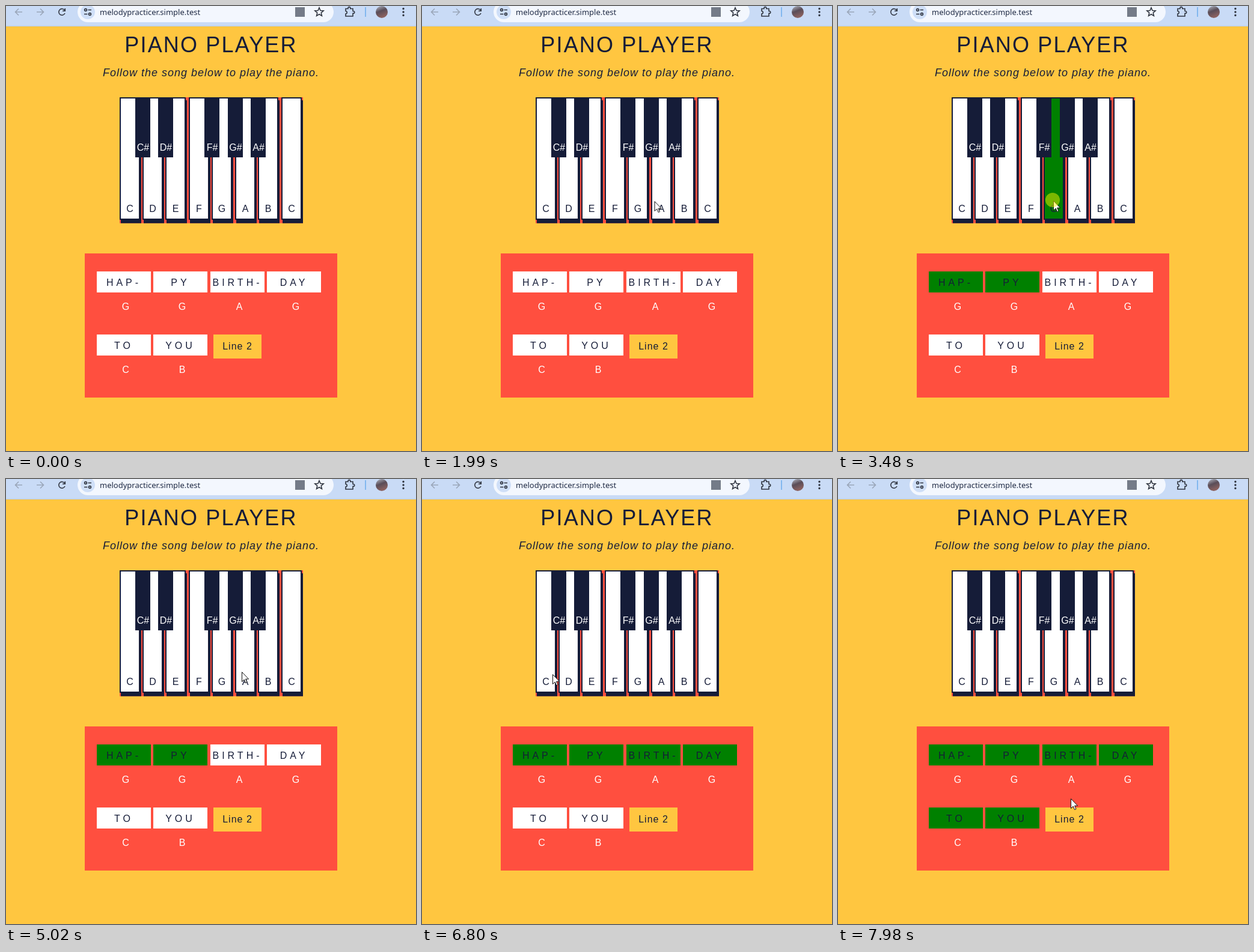
An HTML page that plays this animation: 682x741 px, repeating every 8000 ms.

```html
<!DOCTYPE html>
<html lang="en">
<head>
<meta charset="utf-8">
<title>Piano Player</title>
<style>
  html, body { margin: 0; width: 100%; height: 100%; overflow: hidden; background: #ffc640; }
  svg { display: block; width: 682px; height: 741px; }
  text { font: 16px "Liberation Sans", Arial, sans-serif; fill: #151c38; text-anchor: middle; white-space: pre; }
  .title { font-size: 36px; letter-spacing: .06em; }
  .hint { font-size: 18px; font-style: italic; letter-spacing: 1px; }
  .word { letter-spacing: 5px; }
  .button { letter-spacing: 1px; }
  .light { fill: #fff; }
  .address { font: 13px "Noto Sans", sans-serif; fill: #1f2a44; text-anchor: start; }
  .icon { fill: none; stroke: #303540; stroke-width: 1.6; }
  .faint { stroke: #9aa6b9; }
</style>
</head>
<body>
<svg id="stage" viewBox="0 0 682 741">
  <defs>
    <linearGradient id="avatar" x2=".4" y2="1">
      <stop offset="0" stop-color="#b9bfca"/>
      <stop offset=".5" stop-color="#5a4d58"/>
      <stop offset="1" stop-color="#8c6260"/>
    </linearGradient>
  </defs>
  <rect width="682" height="741" fill="#ffc640"/>
  <rect width="682" height="34" fill="#b5cdf3"/>
  <rect width="682" height="33" fill="#c9dbf6"/>
  <rect x="119" y="-7" width="426" height="34" rx="17" fill="#f3f7fe"/>
  <circle cx="136" cy="10" r="12" fill="#cfdff8"/>
  <text class="address" x="156" y="15">melodypracticer.simple.test</text>
  <g class="icon">
    <path class="faint" d="M27 10H15.5m5.500-5.500L15.5 10l5.500 5.500M51 10h11.500m-5.500-5.500l5.500 5.500l-5.500 5.500"/>
    <path d="M97.500 7A5.300 5.300 0 1 0 98 12M98.300 4v4.300H94"/>
    <circle cx="132.500" cy="6.500" r="1.900"/>
    <circle cx="139.500" cy="13.500" r="1.900"/>
    <path d="M136.500 6.500h5.500M130 13.500h5.500"/>
    <path id="star"/>
    <path d="M565 4.500h4v-1a1.900 1.900 0 0 1 3.800 0v1H577v4h.8a1.900 1.900 0 0 1 0 3.800H577V17h-12v-4a2.200 2.200 0 0 0 0-4.500z"/>
    <path d="M661 4.500h0M661 10h0M661 15.500h0" stroke-width="3.400" stroke-linecap="round" style="stroke-width:3.400"/>
  </g>
  <rect x="481" y="2" width="16" height="16" fill="#747b88"/>
  <rect x="597" y="2" width="2" height="16" fill="#82b8ef"/>
  <circle cx="625" cy="10" r="10" fill="url(#avatar)"/>
</svg>
<script>
const LOOP = 8000, TICK = 70;
const NAVY = '#151c38', RED = '#ff4f3f', GREEN = '#008000', WHITE = '#fff';
const SPACE = 4.445; // width of the blank between inline boxes
const stage = document.getElementById('stage');

// word, note, time of the hit, how long the key stays down
const song = [
  ['HAP-', 'G', 3050, 0], ['PY', 'G', 3480, 130], ['BIRTH-', 'A', 5220, 130],
  ['DAY', 'G', 5910, 130], ['TO', 'C', 6880, 70], ['YOU', 'B', 7480, 130]
];

// start, end, x, y of each pointer move
const moves = [
  [190, 610, 264, 406], [740, 810, 270, 395], [1090, 1640, 422, 326], [1640, 2260, 358, 324],
  [4070, 4340, 278, 331], [4340, 4680, 392, 321], [5350, 5770, 355, 311],
  [6120, 6800, 217, 325], [6950, 7280, 445, 321], [7680, 7980, 387, 532]
];

function add(tag, attrs, parent = stage) {
  const el = document.createElementNS('http://www.w3.org/2000/svg', tag);
  for (const name in attrs) el.setAttribute(name, attrs[name]);
  return parent.appendChild(el);
}

const rect = (x, y, width, height, fill) => add('rect', { x, y, width, height, fill });

function label(content, x, y, style = '') {
  add('text', { x, y, class: style }).textContent = content;
}

// Each entry is [time, properties, steps until the next entry].
function play(el, entries) {
  const frames = entries.map(([time, props, steps = 1]) =>
    ({ ...props, offset: time / LOOP, easing: `steps(${steps}, end)` }));
  frames.push({ ...entries[entries.length - 1][1], offset: 1 });
  el.animate(frames, { duration: LOOP, iterations: Infinity });
}

function toggle(el, prop, off, on, spans) {
  play(el, [[0, { [prop]: off }], ...spans.flatMap(([from, to]) =>
    [[from, { [prop]: on }], [to, { [prop]: off }]])]);
}

const pressSpans = notes => song
  .filter(([, note, , hold]) => hold && notes.includes(note))
  .map(([, , time, hold]) => [time, time + hold]);

const starPoints = Array.from({ length: 10 }, (_, i) => {
  const angle = i * Math.PI / 5, radius = i % 2 ? 3.4 : 7.5;
  return [521 + radius * Math.sin(angle), 10.3 - radius * Math.cos(angle)];
});
document.getElementById('star').setAttribute('d', `M${starPoints.join('L')}Z`);

label('PIANO PLAYER', 341, 77, 'title');
label('Follow the song below to play the piano.', 341, 117, 'hint');

// Piano
const keyLeft = (i, shift = 0) => Math.floor(189 + (34 + SPACE) * i + shift);
rect(189, 152, 305, 209.7, RED);
[...'CDEFGABC'].forEach((note, i) => {
  const x = keyLeft(i);
  rect(x + 2, 157, 34, 204.7, NAVY);
  rect(x, 152, 34, 204, NAVY);
  const face = rect(x + 2, 154, 30, 200, WHITE);
  label(note, x + 17, 343);
  if (i < 7) toggle(face, 'fill', WHITE, GREEN, pressSpans(note));
});
[0, 1, 3, 4, 5].forEach(i => {
  const x = keyLeft(i, 26.3);
  rect(x, 152, 25, 100, NAVY);
  label('CDEFGA'[i] + '#', x + 13, 241, 'light');
});

// Song
rect(131, 412, 420, 240, RED);
song.forEach(([word, note, time], i) => {
  const x = Math.round(151 + (90 + SPACE) * (i % 4));
  const y = i < 4 ? 442 : 547;
  const box = rect(x, y, 90, 35, WHITE);
  label(word, x + 45, y + 24, 'word');
  label(note, x + 48, y + 64, 'light');
  toggle(box, 'fill', WHITE, GREEN, [[time, LOOP]]);
});
rect(345, 547, 80, 40, '#ffc640');
label('Line 2', 385, 572, 'button');

// Pointer
const pointer = add('g', {});
add('path', {
  d: 'M.5 .5V16.5L4.2 13L6.6 18.6L9 17.6L6.6 12.1H11.6Z',
  fill: WHITE, stroke: '#111'
}, pointer);
const halo = add('circle', { cx: -1, cy: -1, r: 12, fill: 'rgba(255,245,0,.48)' }, pointer);
toggle(halo, 'opacity', 0, 1, pressSpans('ABCG'));

const at = (x, y) => ({ transform: `translate(${x}px, ${y}px)` });
let place = at(637, 774);
play(pointer, [[0, place], ...moves.flatMap(([start, end, x, y]) => {
  const from = place;
  place = at(x, y);
  return [[start, from, Math.round((end - start) / TICK)], [end, place]];
})]);
</script>
</body>
</html>
```
